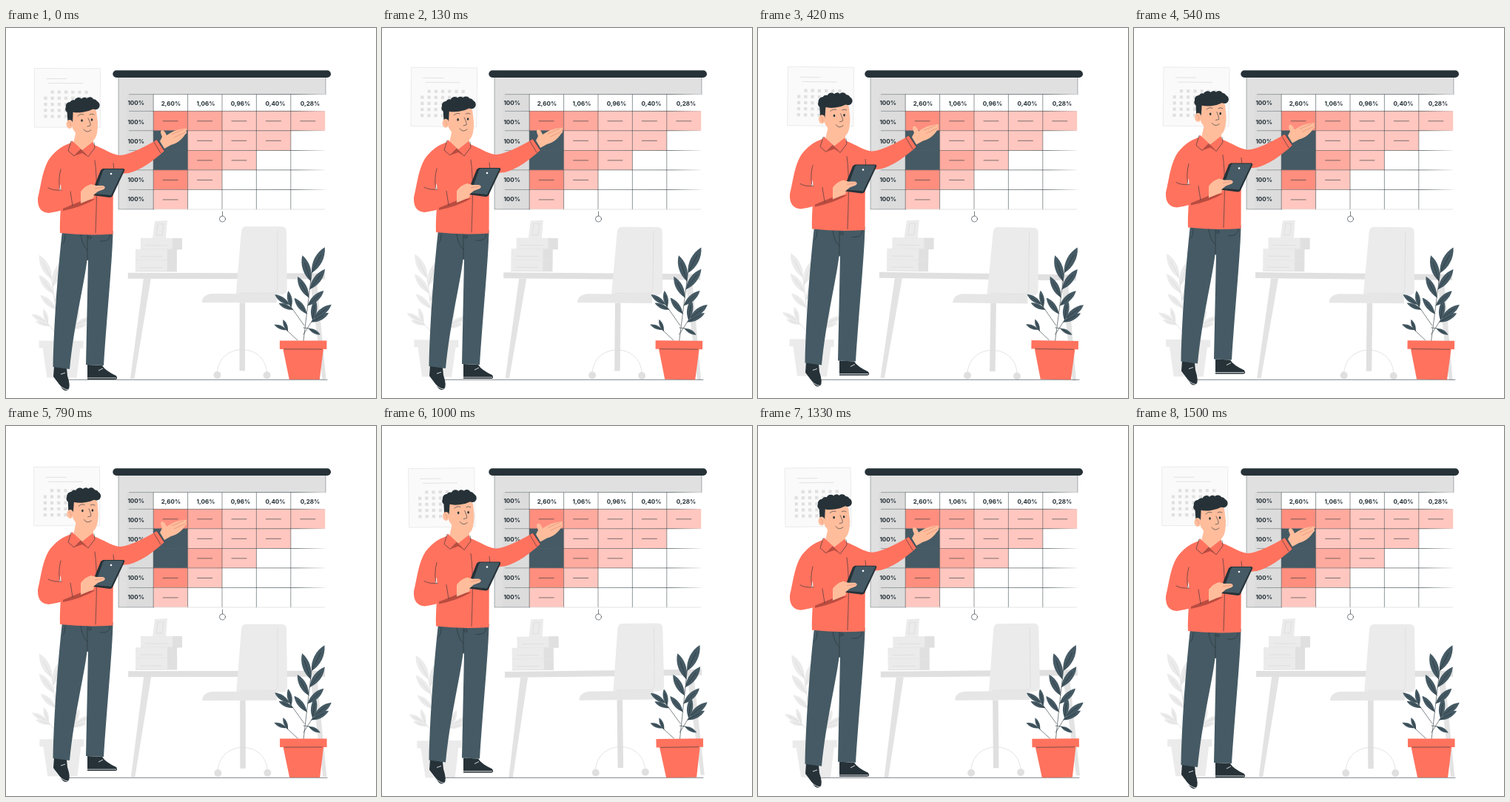
An HTML page that plays this animation: 500 px wide and 500 px high, repeating every 1.54 s.

```html
<!DOCTYPE html>
<html lang="en">
<head>
<meta charset="utf-8">
<style>
  html, body { margin: 0; width: 100%; height: 100%; overflow: hidden; background: #fff; }
  svg { display: block; width: 100vw; height: 100vh; }
  text { font: 700 8.1px Inter, "Open Sans", sans-serif; fill: #263238; text-anchor: middle; }
  .line { fill: none; stroke: #263238; stroke-width: .6; stroke-linecap: round; }
  .soft { fill: none; stroke: #dcdcdc; stroke-width: .8; }
  .lace { fill: none; stroke: #fff; stroke-width: .8; }
  .crease { fill: none; stroke: #d98870; stroke-width: .6; }
  .skin { fill: #ffbd9c; }
  .shirt { fill: #ff725e; }
  .shade { fill: #b94c40; }
  .pants { fill: #455a64; }
  .dark { fill: #263238; }
  .pale { fill: #ebebeb; }
  .grey { fill: #e0e0e0; }
</style>
</head>
<body>
<svg viewBox="0 0 500 500">
  <defs>
    <linearGradient id="fade" gradientUnits="userSpaceOnUse" x1="160" x2="432" y1="0" y2="0">
      <stop offset="0" stop-color="#263238" stop-opacity=".5"/>
      <stop offset=".85" stop-color="#263238" stop-opacity=".85"/>
      <stop offset="1" stop-color="#263238" stop-opacity=".1"/>
    </linearGradient>
  </defs>

  <g id="room">
    <g id="calendar">
      <rect x="38" y="55" width="89" height="79.500" fill="#fafafa" stroke="#e6e6e6" stroke-width=".8"/>
      <path class="soft" d="M54 69H82M57 75H104"/>
    </g>
    <g id="palePlant"></g>
    <path class="pale" d="M45 423H105V433H101L96 473H56L50 433H45Z"/>

    <path fill="#e3e3e3" d="M186 339H196L174 474H168.500ZM411 339H420L433 474H428Z"/>
    <rect class="grey" x="165" y="331" width="266" height="8"/>
    <path class="pale" d="M201 261L218 260L216 285H198Z"/>
    <path class="soft" stroke-width="2" d="M205 265H213L211 280H203Z"/>
    <g id="books"></g>

    <rect class="grey" x="316" y="371" width="7.500" height="92"/>
    <path class="pale" d="M324 268H372Q379 268 379 275L380 352Q380 360 372 360H311L318 275Q319 268 324 268Z"/>
    <path class="soft" d="M367 273V350Q367 358 360 358H316M286 466C288 424 351 424 353 466"/>
    <path fill="#e6e6e6" d="M265 371Q265 361 278 359H366V371Z"/>
    <circle class="grey" cx="286" cy="469" r="5"/>
    <circle class="grey" cx="353" cy="469" r="5"/>
  </g>

  <g id="board">
    <rect class="grey" x="152" y="67" width="280" height="178"/>
    <rect x="163" y="90" width="36" height="155" fill="#dcdcdc"/>
    <rect x="199" y="90" width="233" height="155" fill="#fff"/>
    <path class="line" stroke-opacity=".6" d="M152 67V245H200M432 67V90"/>
  </g>
  <rect class="dark" x="144.300" y="57.300" width="294.700" height="9.700" rx="4.800"/>
  <path class="line" d="M292.500 248V254M84 475.300H434"/>
  <circle class="line" cx="292.500" cy="258" r="4"/>

  <g id="plant">
    <g id="darkPlant"></g>
    <path class="shirt" d="M370 422.500H433.500V434H429L424 475H383L374.500 434H370Z"/>
    <path class="line" d="M376 434H427"/>
  </g>

  <g id="man">
    <path class="dark" d="M65 457L82 460L83 470Q88 485 84 489Q79 492 75 486L64 471Z"/>
    <path class="dark" d="M110 455L130 456Q134 463 149 470Q152 475 147 475H110Z"/>
    <path class="lace" d="M67 476Q76 489 84 489M110 473H149M74 468L80 466M125 463L131 460"/>
    <path class="pants" d="M76 274H144.500C144 310 137 380 132 456L108 455L111 314H109.500C105 350 92 400 86 461L63.500 458C65 390 71 320 76 274Z"/>
    <path class="line" d="M110 280V312M80 279Q80 290 76 292M141 279Q140 290 127 288M101 279Q103 295 110 300"/>
    <circle class="line" cx="113" cy="283" r="2"/>

    <path class="skin" d="M95 138L118 146V162L104 176L90 160Z"/>
    <path class="shirt" d="M88 155L102 166L119 158C132 163 143 171 153 172Q168 172 204 151L214 166C197 181 184 191 166 196L146 198C144 220 145 250 144.500 278.500Q108 281 73 277C72 258 76 230 74 212L57 182C64 166 75 160 88 155Z"/>
    <path class="shirt" d="M66 169C50 180 48 211 43 230Q42 249 58 250Q78 247 101 238L102 220L72 219L78 190Z"/>
    <path class="shade" d="M77 244L104 233L121 231Q102 242 77 247Z"/>
    <path class="line" d="M57 216Q63 220 75 219M74 191Q70 207 73 218M120 179C124 205 122 247 121 277M87 221L90 240M145 183Q147 196 144 202M204 151L214 166M200 154L209 169"/>
    <path class="shirt" d="M89 152L84 165L91 174L101 164L111 175L121 161L117 154L103 165Z"/>
    <path class="line" d="M88 153L84 166L92 173L101 164L111 174L120 162L119 155"/>
    <path class="shade" d="M92 173L101 164L111 174L103 169Z"/>

    <path class="skin" d="M208 153L211 147Q207 139 211 138Q215 139 217 145Q228 137 240 136Q247 135 243 139Q246 141 242 144C238 150 232 156 223 158L214 163Z"/>
    <path class="crease" d="M227 148L242 141M224 144L240 137"/>

    <path class="skin" d="M101 221Q107 213 115 211L124 214L118 230L101 237Z"/>
    <path class="dark" d="M131 190H158Q161 190 160 193L144 227Q143 229 140 229L117 226Q114 225 116 222L128 192Z"/>
    <path class="pants" d="M133 191H157Q159 191 158 193L142 226L120 224L131 193Z"/>
    <circle cx="142" cy="197" r="1.300" fill="#fff"/>
    <path class="skin" d="M108 216Q115 210 122 213L131 213Q136 215 132 218L124 221L117 227H108Z"/>
    <path class="crease" d="M120 217L132 215"/>

    <g id="head">
      <path class="skin" d="M88 112C96 101 114 104 122 112L124 128C124 143 122 152 114 154Q104 155 97 146L90 136Z"/>
      <g id="hair" class="dark" transform="rotate(-8 103 107)"></g>
      <path class="dark" d="M82 106H91L90 128L84 134Z"/>
      <ellipse class="skin" cx="86" cy="130" rx="4.500" ry="6"/>
      <path class="crease" d="M84 127Q88 128 87 133"/>
      <path class="line" stroke-width="1" d="M97 119Q101 115 105 117M113 117Q116 115 119 117M111 122Q115 130 114 132L110 133M105 137Q109 143 115 138"/>
      <ellipse class="dark" cx="102.500" cy="125" rx="1.300" ry="1.800"/>
      <ellipse class="dark" cx="116" cy="124" rx="1.300" ry="1.800"/>
    </g>
  </g>
</svg>
<script>
  const LOOP = 1540, STEP = 40, LEAD = 40, TAU = 2 * Math.PI;
  const LEFT = -1, RIGHT = 1;
  const $ = id => document.getElementById(id);
  const turn = (id, value) => $(id).setAttribute("transform", value);

  function add(parent, tag, attrs, text = "") {
    const el = document.createElementNS("http://www.w3.org/2000/svg", tag);
    for (const key in attrs) el.setAttribute(key, attrs[key]);
    el.textContent = text;
    parent.appendChild(el);
  }

  // Pointed leaf growing from (x, y) at an angle in degrees.
  function leaf(plant, x, y, angle, len, look) {
    const w = len * .19;
    const g = { transform: `translate(${x} ${y}) rotate(${angle})` };
    add(plant, "path", { ...g, class: look.fill, d: `M0 0C${len * .3} ${w} ${len * .7} ${w} ${len} 0C${len * .7} ${-w} ${len * .3} ${-w} 0 0` });
    add(plant, "path", { ...g, class: look.stroke, d: `M0 0H${len * .7}` });
  }

  // A stem with leaves on alternating sides, opening wider and shorter towards the base.
  function sprig(plant, look, x0, y0, x1, y1, count, len, side) {
    const dx = x1 - x0, dy = y1 - y0, angle = Math.atan2(dy, dx) * 360 / TAU;
    add(plant, "path", { d: `M${x0} ${y0}L${x1} ${y1}`, class: look.stroke });
    for (let i = 0; i < count; i++, side = -side) {
      const at = 1 - i * .12;
      leaf(plant, x0 + dx * at, y0 + dy * at, angle + side * (20 + i * 5), len * (1 - i * .06), look);
    }
  }

  const dark = { fill: "pants", stroke: "line" }, pale = { fill: "pale", stroke: "soft" };
  const bush = $("darkPlant"), shrub = $("palePlant");
  sprig(bush, dark, 402, 423, 413, 331, 6, 39, RIGHT);
  sprig(bush, dark, 403, 402, 383, 374, 3, 24, LEFT);
  sprig(bush, dark, 402, 414, 416, 392, 3, 30, RIGHT);
  sprig(bush, dark, 394, 422, 379, 408, 2, 18, LEFT);
  sprig(bush, dark, 402, 405, 409, 406, 1, 18, RIGHT);
  sprig(shrub, pale, 73, 424, 62, 340, 6, 37, LEFT);
  sprig(shrub, pale, 73, 418, 55, 398, 3, 23, LEFT);
  sprig(shrub, pale, 75, 420, 93, 402, 3, 25, RIGHT);

  // Curls set around a cap of hair.
  add($("hair"), "ellipse", { cx: 103, cy: 106, rx: 20, ry: 8 });
  for (let i = 0; i < 8; i++) {
    const a = Math.PI * (1 + i / 7);
    add($("hair"), "circle", { cx: 103 + 18 * Math.cos(a), cy: 107 + 8 * Math.sin(a), r: 5 + i % 2 * .8 });
  }

  for (let i = 1; i < 35; i++)
    add($("calendar"), "rect", { x: 51 + i % 7 * 9.2, y: 85 + Math.floor(i / 7) * 8.2, width: 4.2, height: 4.2, class: "grey" });

  for (let i = 0; i < 3; i++) {
    const x = i ? 175 : 182, y = 284 + i * 15;
    add($("books"), "rect", { x, y, width: 56, height: 15, class: "pale" });
    add($("books"), "rect", { x: x + 43, y, width: 13, height: 15, class: "grey" });
    add($("books"), "path", { d: `M${x} ${y + 15}h56m-50 -5h30`, class: "soft" });
  }

  // One letter per cell: strong, mid, pale or dark.
  const board = $("board"), W = 46.4, H = 26.55;
  const col = i => 199.2 + i * W, row = i => 112.2 + i * H;
  const tint = { s: "#ff8e7e", m: "#ffaa9e", p: "#ffc7bf", d: "#455a64" };
  ["smppp", "dppp", "dmp", "sp", "p"].forEach((cells, r) => [...cells].forEach((k, c) => {
    add(board, "rect", { x: col(c), y: row(r), width: W, height: H, fill: tint[k] });
    if (k !== "d") add(board, "path", { d: `M${col(c) + 13} ${row(r) + H / 2 + .3}h20`, class: "line" });
  }));
  for (let i = 0; i < 5; i++) {
    add(board, "rect", { x: 166, y: row(i) - .3, width: 265, height: .7, fill: "url(#fade)" });
    add(board, "path", { d: `M${col(i)} 90V245`, class: "line", "stroke-opacity": .85 });
  }
  add(board, "rect", { x: 166, y: 89.4, width: 265, height: .7, fill: "url(#fade)" });
  add(board, "path", { d: "M200 245H431", class: "soft" });

  for (let i = 0; i < 6; i++)
    if (i !== 3) add(board, "text", { x: 175.7, y: 104.2 + i * 25.9 }, "100%");
  ["2,60%", "1,06%", "0,96%", "0,40%", "0,28%"].forEach((s, i) =>
    add(board, "text", { x: 223 + i * 47, y: 104.5 }, s));

  function draw(now) {
    const t = Math.floor((now % LOOP) / STEP) * STEP;
    const a = (t + LEAD) / LOOP * TAU;
    const sway = .8 * Math.sin(a), lift = (1 - Math.cos(a)) / 2;
    turn("room", `rotate(${sway} 250 250)`);
    turn("plant", `rotate(${sway} 405 385)`);
    turn("man", `translate(0 ${-9 * lift})`);
    turn("head", `translate(0 ${-1.5 * lift}) rotate(${2 * lift} 104 150)`);
  }

  const start = performance.now();
  (function tick() {
    draw(performance.now() - start);
    requestAnimationFrame(tick);
  })();
</script>
</body>
</html>
```
